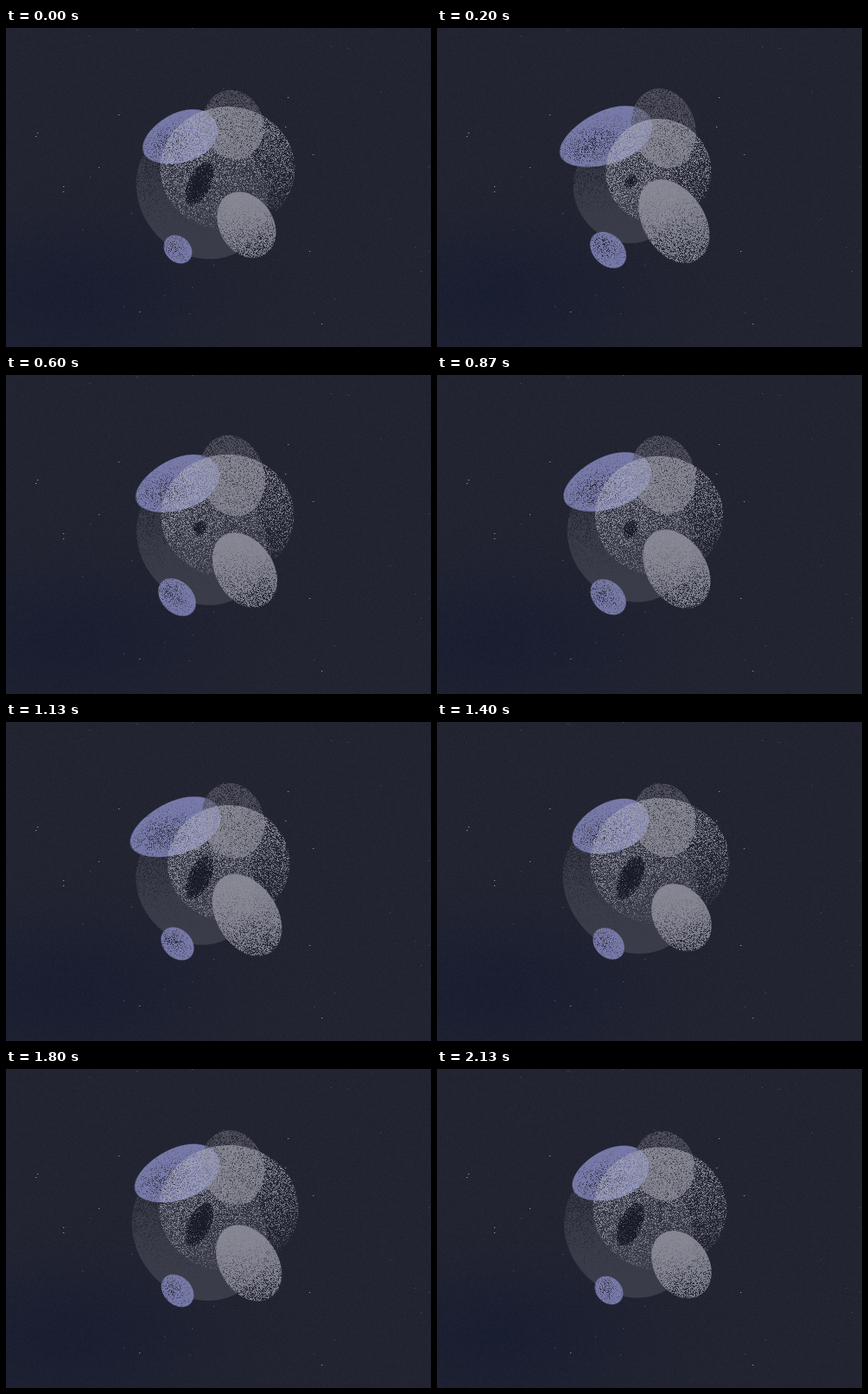
Write an HTML page with a canvas that moves like this. It is 492 by 369 pixels and loops after 2190 ms.

```html
<!DOCTYPE html>
<html lang="en">
<head>
<meta charset="utf-8">
<title>Grainy blobs in space</title>
<style>
  html, body { margin: 0; width: 100%; height: 100%; overflow: hidden; background: #222432; }
  canvas { display: block; width: 492px; height: 369px; }
</style>
</head>
<body>
<canvas id="stage" width="492" height="369"></canvas>
<script>
const W = 492, H = 369, LOOP = 2190;
const BOX = { x: 140, y: 67, w: 204, h: 215 };
const ctx = document.getElementById('stage').getContext('2d');

const clamp = (v, lo = 0, hi = 1) => Math.min(hi, Math.max(lo, v));
const ease = (from, to, v) => {
  const s = clamp((v - from) / (to - from));
  return s * s * (3 - 2 * s);
};
const hill = (x, y, w, h) => Math.exp(-((x / w) ** 2) - (y / h) ** 2);

// Repeatable noise in 0..1 for a pixel and a seed
function noise(x, y, seed) {
  let h = Math.imul(x, 374761393) ^ Math.imul(y, 668265263) ^ Math.imul(seed + 1, 1442695041);
  h = Math.imul(h ^ (h >>> 13), 1274126177);
  h = Math.imul(h ^ (h >>> 16), 2246822519);
  return ((h ^ (h >>> 15)) >>> 0) / 4294967296;
}

// Smooth curve through a few values at the key ticks
const KEYS = [0, 3, 9, 17, 21, 27, 32];
function curve(values, tick) {
  const last = KEYS.length - 1;
  const slope = i => {
    const lo = Math.max(i - 1, 0), hi = Math.min(i + 1, last);
    return (values[hi] - values[lo]) / (KEYS[hi] - KEYS[lo]);
  };
  let i = last - 1;
  while (KEYS[i] > tick) i--;
  const span = KEYS[i + 1] - KEYS[i], s = (tick - KEYS[i]) / span, r = 1 - s;
  return values[i] * r * r * (1 + 2 * s) + values[i + 1] * s * s * (3 - 2 * s)
    + span * s * r * (slope(i) * r - slope(i + 1) * s);
}

// The few motions that drive every shape
function motionsAt(tick) {
  const swell = curve([0, 0.85, 1, 0.5, 0.35, 0.45, 0], tick);
  return {
    squeeze: curve([0.13, 1, 0.18, 0.5, 0, 0, 0.16], tick),
    reach: curve([0, 1, 0.5, 0.9, 0.1, 0.58, 0.1], tick),
    swell,
    shrink: ease(0.5, 0.85, swell),
    drift: ease(8, 20, tick)
  };
}

// rest is [cx, cy, long radius, short radius]; moves add to it
const blob = (degrees, taper, rest, moves) => ({
  cos: Math.cos(degrees * Math.PI / 180),
  sin: Math.sin(degrees * Math.PI / 180),
  taper, rest, moves
});

const SHAPES = [
  blob(50, 0, [228, 190, 84, 74], { squeeze: [-10, -2, -21, -16], drift: [-4, -2, 0, 0] }),
  blob(-22, 0.12, [201.5, 127, 45.5, 28.5], { reach: [-6, 0, 11, 2], drift: [0, -5, 0, 0] }),
  blob(0, 0, [256.5, 162, 80.5, 73], { squeeze: [0, 4, -19.5, -12], drift: [1.5, -1, 0, 0] }),
  blob(75, 0, [263, 112, 40.5, 35], { swell: [-1, 4.5, 7, 2] }),
  blob(-65, 0, [224, 180, 27, 13], { shrink: [0, -2.5, -18, -6] }),
  blob(58, 0.03, [278, 227.5, 40.5, 31.2], { reach: [-4, -4, 12, 4.3], drift: [5, -1, 0, 0] }),
  blob(45, 0, [199, 256, 18, 14.5], { swell: [-1, 1, 7, 3.5] })
];

// Returns a test giving cover and local position for a pixel
function place(shape, motions) {
  const { cos, sin, taper } = shape;
  const [cx, cy, a, b] = shape.rest.map((v, c) =>
    Object.entries(shape.moves).reduce((sum, [name, by]) => sum + motions[name] * by[c], v));
  const tall = Math.hypot(a * sin, b * cos);
  const out = {};
  return (x, y) => {
    const dx = x + 0.5 - cx, dy = y + 0.5 - cy;
    out.u = (dx * cos + dy * sin) / a;
    out.v = (dy * cos - dx * sin) / (b * (1 + taper * clamp(out.u, -1, 1)));
    out.across = dx / a;
    out.down = dy / tall;
    out.cover = clamp((1 - Math.hypot(out.u, out.v)) * b + 0.5);
    return out;
  };
}

function makeSky() {
  const img = ctx.createImageData(W, H), d = img.data;
  for (let y = 0; y < H; y++) for (let x = 0; x < W; x++) {
    const i = (y * W + x) * 4, grain = (noise(x, y, 900) - 0.5) * 6;
    const blue = hill(x - 70, y - 310, 150, 80);
    d[i] = 34 - 8 * blue + grain;
    d[i + 1] = 36 - 6 * blue + grain;
    d[i + 2] = 49 + grain;
    d[i + 3] = 255;
  }
  const star = (x, y, light) => {
    for (let c = 0; c < 3; c++) {
      d[(y * W + x) * 4 + c] += light;
      d[(y * W + x + 1) * 4 + c] += light * 0.3;
    }
  };
  const bright = [[36, 121], [34, 125], [66, 183], [66, 189], [130, 100], [326, 80],
    [323, 114], [355, 146], [351, 258], [365, 342], [154, 328], [107, 161]];
  bright.forEach(([x, y]) => star(x, y, 110));
  for (let n = 0; n < 24; n++) {
    star(Math.floor(noise(n, 1, 7) * W), Math.floor(noise(n, 2, 7) * H), 40);
  }
  return img;
}

const sky = makeSky();
const VIOLET = [122, 125, 172];

function render(tick) {
  const img = ctx.createImageData(BOX.w, BOX.h), d = img.data;
  const motions = motionsAt(tick);
  const tests = SHAPES.map(s => place(s, motions));
  let r, g, b, px, py;

  // Blend a grainy colour over the current pixel
  const speck = (color, density, cover, layer) => {
    if (density <= 0 || cover <= 0) return;
    const n = noise(px, py, tick * 8 + layer);
    const k = clamp((density - n) * 2 + 0.5) * clamp(density * 6) * cover;
    r += (color[0] - r) * k;
    g += (color[1] - g) * k;
    b += (color[2] - b) * k;
  };

  for (let j = 0; j < BOX.h; j++) for (let i = 0; i < BOX.w; i++) {
    px = BOX.x + i;
    py = BOX.y + j;
    const s = (py * W + px) * 4, o = (j * BOX.w + i) * 4;
    r = sky.data[s]; g = sky.data[s + 1]; b = sky.data[s + 2];
    const [body, wing, ball, bump, hole, egg, foot] = tests.map(test => test(px, py));

    speck([60, 61, 74], clamp(0.8 + 0.5 * body.down, 0.6, 1.3), body.cover * 0.97, 0);
    speck(VIOLET, 1.15 - 0.5 * hill(wing.u + 0.3, wing.v - 0.1, 0.65, 0.7), wing.cover * 0.97, 1);

    const dense = 0.32 - 0.25 * ball.down - 0.08 * ball.across + 0.1 * motions.squeeze + 0.1 * wing.cover;
    speck([170, 171, 184], dense, ball.cover * 0.72, 2);

    speck([84, 85, 97], 0.68, bump.cover * (1 - ball.cover) * 0.9, 3);
    speck([138, 139, 150], 0.8, bump.cover * ball.cover * (1 - 0.7 * wing.cover) * 0.8, 3);

    speck([20, 21, 34], 1 - 0.15 * motions.shrink - 0.4 * (hole.u ** 2 + hole.v ** 2), hole.cover * 0.9, 4);
    speck([141, 142, 154], clamp(0.88 - 0.4 * egg.down, 0.5, 1.2), egg.cover * 0.88, 5);
    speck(VIOLET, 1.05 - 0.4 * hill(foot.u + 0.3, foot.v, 0.7, 0.7), foot.cover * 0.95, 6);

    d[o] = r; d[o + 1] = g; d[o + 2] = b; d[o + 3] = 255;
  }
  return img;
}

const cache = [];
const start = performance.now();
let shown = -1;

function loop() {
  const ms = (performance.now() - start) % LOOP;
  // Fifteen poses a second, changing on whole hundredths
  let tick = Math.floor((Math.floor(ms / 10) + 0.4) * 0.15);
  // A short rest between the bursts of movement
  if (tick % 8 === 0 && tick > 0 && tick < 32) tick--;
  if (tick !== shown) {
    cache[tick] = cache[tick] || render(tick);
    ctx.putImageData(cache[tick], BOX.x, BOX.y);
    shown = tick;
  }
  requestAnimationFrame(loop);
}

ctx.putImageData(sky, 0, 0);
loop();
</script>
</body>
</html>
```
